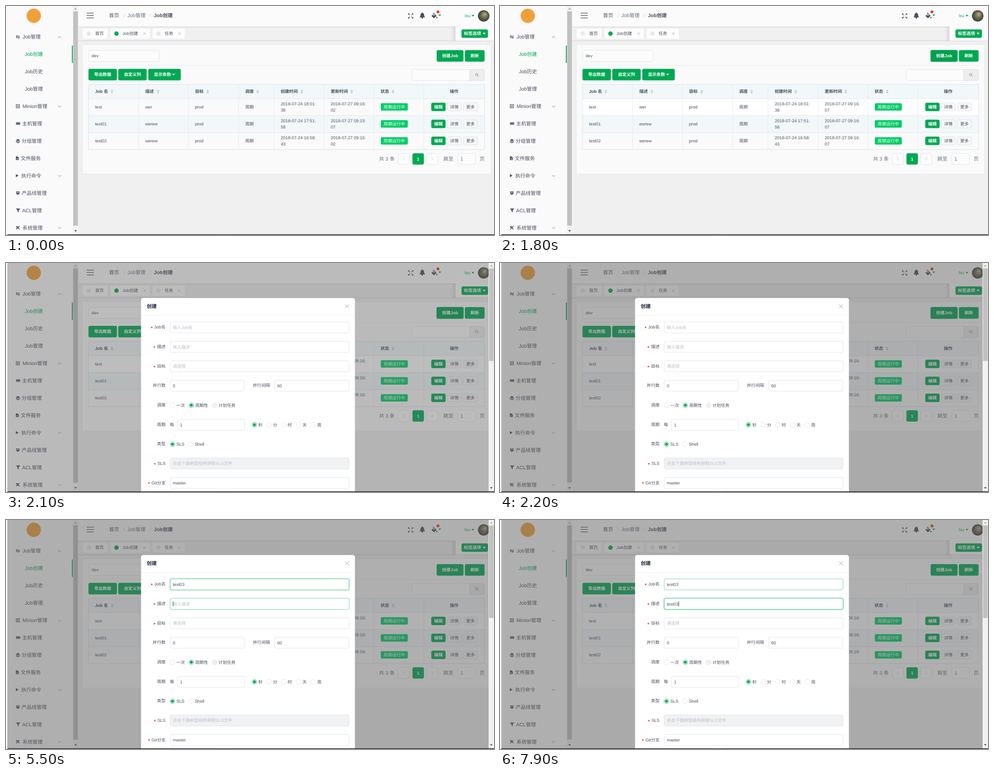
Write an HTML page with a canvas that moves like this. It is 1089 px wide and 514 px high and loops after 8 s.

```html
<!DOCTYPE html>
<html lang="zh-CN">
<head>
<meta charset="utf-8">
<title>Job创建</title>
<style>
html, body { margin: 0; width: 100%; height: 100%; overflow: hidden; background: #fff; }
canvas { display: block; width: 1089px; height: 514px; }
</style>
</head>
<body>
<canvas id="stage"></canvas>
<script>
const W = 1089, H = 514, LOOP = 8000, TICK = 100;
const S = 9.57, M = 11.16;
const FONT = '"Liberation Sans", "Noto Sans CJK SC", "Noto Sans CJK", sans-serif';
const GREEN = '#00a854', INK = '#495060', SOFT = '#657180', HINT = '#bbbec4', LINE = '#d7dde4';
const dpr = window.devicePixelRatio || 1;

function prepare(canvas) {
  canvas.width = W * dpr;
  canvas.height = H * dpr;
  return canvas.getContext('2d');
}
const stage = prepare(document.getElementById('stage'));
const layerCanvas = document.createElement('canvas');
const layer = prepare(layerCanvas);
let g = stage;

// ---------- drawing helpers ----------
function text(s, x, y, { size = S, color = INK, bold = false, align = 'left' } = {}) {
  g.font = `${bold ? 'bold ' : ''}${size}px ${FONT}`;
  g.textRendering = 'geometricPrecision';
  g.textAlign = align;
  g.fillStyle = color;
  g.fillText(s, x, y + size * 0.36);
}
function rect(x1, y1, x2, y2, fill) {
  g.fillStyle = fill;
  g.fillRect(x1, y1, x2 - x1, y2 - y1);
}
function box(x1, y1, x2, y2, fill, stroke, r = 3.2) {
  g.beginPath();
  g.roundRect(x1 + 0.4, y1 + 0.4, x2 - x1 - 0.8, y2 - y1 - 0.8, r);
  if (fill) { g.fillStyle = fill; g.fill(); }
  if (stroke) { g.strokeStyle = stroke; g.lineWidth = 0.8; g.stroke(); }
}
function path(points, { fill, stroke, width = 1, close = !!fill } = {}) {
  g.beginPath();
  points.forEach(([x, y], i) => i ? g.lineTo(x, y) : g.moveTo(x, y));
  if (close) g.closePath();
  if (fill) { g.fillStyle = fill; g.fill(); }
  if (stroke) { g.strokeStyle = stroke; g.lineWidth = width; g.stroke(); }
}
function dot(x, y, r, fill, stroke) {
  g.beginPath();
  g.arc(x, y, r, 0, Math.PI * 2);
  if (fill) { g.fillStyle = fill; g.fill(); }
  if (stroke) { g.strokeStyle = stroke; g.lineWidth = 0.8; g.stroke(); }
}
function tri(x, y, w, h, fill) {
  path([[x - w / 2, y - h / 2], [x + w / 2, y - h / 2], [x, y + h / 2]], { fill });
}
function cross(x, y, r, stroke, width) {
  path([[x - r, y - r], [x + r, y + r]], { stroke, width });
  path([[x - r, y + r], [x + r, y - r]], { stroke, width });
}
function fade(x1, y1, x2, y2, horizontal, from, to) {
  const grad = horizontal ? g.createLinearGradient(x1, 0, x2, 0) : g.createLinearGradient(0, y1, 0, y2);
  grad.addColorStop(0, from);
  grad.addColorStop(1, to);
  rect(x1, y1, x2, y2, grad);
}
function button(label, x1, y1, x2, y2, fill = GREEN, dx = 0) {
  box(x1, y1, x2, y2, fill, fill, 2.8);
  text(label, (x1 + x2) / 2 + dx, (y1 + y2) / 2, { color: '#fff', bold: true, align: 'center' });
}
function plainButton(label, x1, y1, x2, y2) {
  box(x1, y1, x2, y2, '#f7f7f7', LINE, 2.6);
  text(label, (x1 + x2) / 2, (y1 + y2) / 2, { align: 'center' });
}
const clamp = v => Math.max(0, Math.min(1, v));
const ramp = (t, start, length) => clamp((t - start) / length);
function mix(a, b, k) {
  return `rgb(${a.map((v, i) => Math.round(v + (b[i] - v) * k)).join()})`;
}

// ---------- sidebar ----------
const icons = {
  swap(x, y, c) {
    rect(x + 1.5, y - 2.3, x + 9, y - 1, c);
    rect(x, y + 1, x + 7.5, y + 2.3, c);
    path([[x, y - 1.6], [x + 3, y - 4], [x + 3, y + 0.6]], { fill: c });
    path([[x + 9, y + 1.6], [x + 6, y - 0.6], [x + 6, y + 4]], { fill: c });
  },
  grid(x, y, c) {
    for (let i = 0; i < 9; i++) {
      const gx = x + (i % 3) * 3.3, gy = y - 4.4 + Math.floor(i / 3) * 3.3;
      rect(gx, gy, gx + 2.2, gy + 2.2, c);
    }
  },
  keys(x, y, c) {
    box(x, y - 3, x + 10, y + 3, c, null, 0.8);
    for (let i = 0; i < 4; i++) rect(x + 1.3 + i * 2, y - 1.5, x + 2.2 + i * 2, y - 0.5, '#ccc');
    rect(x + 2.5, y + 0.8, x + 7.5, y + 1.5, '#ccc');
  },
  layers(x, y, c) {
    path([[x, y - 2], [x + 4.6, y - 4.3], [x + 9.2, y - 2], [x + 4.6, y + 0.3]], { fill: c });
    for (const d of [0.5, 2.7]) {
      path([[x + 0.2, y - 0.3 + d], [x + 4.6, y + 1.7 + d], [x + 9, y - 0.3 + d]], { stroke: c, width: 1.2 });
    }
  },
  doc(x, y, c) {
    path([[x, y - 4], [x + 4, y - 4], [x + 6.5, y - 1.5], [x + 6.5, y + 4], [x, y + 4]], { fill: c });
    rect(x + 1.3, y, x + 5, y + 0.7, '#eee');
    rect(x + 1.3, y + 1.8, x + 5, y + 2.5, '#eee');
  },
  play(x, y, c) { path([[x, y - 3.6], [x + 6, y], [x, y + 3.6]], { fill: c }); },
  crate(x, y, c) {
    path([[x, y - 2.5], [x + 2.3, y - 4], [x + 4.5, y - 2.4], [x + 6.7, y - 4], [x + 9, y - 2.5],
      [x + 7, y - 0.6], [x + 9, y + 1], [x + 4.5, y + 4.3], [x, y + 1], [x + 2, y - 0.6]], { fill: c });
    path([[x + 2.6, y - 0.7], [x + 4.5, y - 1.9], [x + 6.4, y - 0.7], [x + 4.5, y + 0.6]], { fill: '#f2f2f2' });
  },
  funnel(x, y, c) {
    path([[x, y - 4], [x + 10, y - 4], [x + 6.3, y], [x + 6.3, y + 4.5], [x + 3.7, y + 3], [x + 3.7, y]], { fill: c });
  },
  tools(x, y, c) {
    path([[x + 1, y + 3.6], [x + 8, y - 3.4]], { stroke: c, width: 1.7 });
    path([[x + 2.4, y - 2], [x + 8.2, y + 3.6]], { stroke: c, width: 1.7 });
    path([[x, y - 2], [x + 3.6, y - 4.2], [x + 4, y - 1.4], [x + 1.4, y]], { fill: c });
  }
};
const menu = [
  ['Job管理', 37, 'swap', 'up'], ['Job创建', 42], ['Job历史', 42], ['Job管理', 42],
  ['Minion管理', 37, 'grid', 'down'], ['主机管理', 36, 'keys'], ['分组管理', 35, 'layers'],
  ['文件服务', 33, 'doc'], ['执行命令', 34, 'play', 'down'], ['产品线管理', 35, 'crate'],
  ['ACL管理', 36, 'funnel'], ['系统管理', 37, 'tools', 'down']
];
function sidebar() {
  rect(0, 0, 149, H, '#fafafa');
  dot(62, 22, 16, '#f0a03a');
  menu.forEach(([label, x, icon, arrow], i) => {
    const y = 69.3 + i * 38.93, active = i === 1;
    if (icon) icons[icon](22, y, INK);
    text(label, x, y, { size: M, color: active ? GREEN : INK });
    if (active) rect(147, y - 19.5, 149, y + 19.5, GREEN);
    if (arrow) {
      const d = arrow === 'up' ? -1.8 : 1.8;
      path([[116, y + 0.5 - d], [119.7, y + 0.5 + d], [123.4, y + 0.5 - d]], { stroke: SOFT, width: 0.9 });
    }
  });
  rect(149, 0, 161.5, H, '#f1f1f1');
  rect(150, 12, 160.5, 493, '#c1c1c1');
  tri(155.3, 6, 6, -3.5, '#a3a3a3');
  tri(155.3, 505, 6, 3.5, '#505050');
}

// ---------- header and tabs ----------
function header() {
  rect(161.5, 46, W, H, '#f0f0f0');
  rect(161.5, 0, W, 46, '#fbfbfb');
  fade(161.5, 46, W, 49, false, 'rgba(0,0,0,.09)', 'rgba(0,0,0,0)');
  for (let i = 0; i < 3; i++) rect(180, 15.3 + i * 5.4, 196, 16.6 + i * 5.4, INK);
  text('首页', 230, 21, { size: M });
  text('/', 262.5, 21, { size: M, color: '#c9ced6' });
  text('Job管理', 271, 21, { size: M, color: SOFT });
  text('/', 320.5, 21, { size: M, color: '#c9ced6' });
  text('Job创建', 330, 21, { size: M, bold: true });

  for (const sx of [-1, 1]) for (const sy of [-1, 1]) {
    const p = (a, b) => [903 + sx * a, 22.2 + sy * b];
    path([p(5.8, 5.8), p(2.4, 5.8), p(5.8, 2.4)], { fill: INK });
    path([p(1.6, 1.6), p(5, 5)], { stroke: INK, width: 1.3 });
  }
  g.beginPath();
  g.moveTo(922.7, 25.5);
  g.quadraticCurveTo(925, 23, 925, 20);
  g.bezierCurveTo(925, 14, 933, 14, 933, 20);
  g.quadraticCurveTo(933, 23, 935.3, 25.5);
  g.closePath();
  g.fillStyle = INK;
  g.fill();
  dot(929, 26.6, 1.8, INK);
  rect(928.2, 14.6, 929.8, 17, INK);
  dot(964, 13.3, 3.2, '#ed3f14');
  path([[949.5, 22.5], [955, 16.5], [961, 22], [955, 27.5]], { fill: INK });
  path([[952, 21], [955.2, 18], [958, 21]], { fill: '#eee' });
  path([[953, 15], [957, 19]], { stroke: INK, width: 1.1 });
  dot(961.5, 26, 1.6, INK);
  tri(968, 21, 6, 4, GREEN);
  text('lxu', 1023.8, 22, { color: GREEN });
  tri(1042, 22, 6, 4, GREEN);

  const hue = g.createRadialGradient(1069, 18, 1, 1066, 22, 13);
  hue.addColorStop(0, '#b3a78a');
  hue.addColorStop(0.5, '#6d6a50');
  hue.addColorStop(1, '#3b4236');
  dot(1066, 22.3, 12.8, hue);
}
function tabs() {
  fade(161.5, 77, W, 80, false, 'rgba(0,0,0,.1)', 'rgba(0,0,0,0)');
  const tags = [
    [170, 228, 185, '首页', 199], [232, 322, 246.5, 'Job创建', 260, 309], [326, 400, 340, '任务', 354, 387]
  ];
  tags.forEach(([x1, x2, dx, label, tx, cx], i) => {
    box(x1, 49.5, x2, 74.5, '#fcfcfc', '#e9eaec', 2.4);
    dot(dx, 62, 4.9, i === 1 ? GREEN : '#e4eaee');
    text(label, tx, 62);
    if (cx) cross(cx, 62, 2.7, '#a0a4aa', 0.8);
  });
  fade(993, 46, 1003, 78, true, 'rgba(0,0,0,0)', 'rgba(0,0,0,.1)');
  rect(1003, 46, W, 77.5, '#fdfdfd');
  button('标签选项', 1016.5, 52.5, 1075.5, 71.5, GREEN, -5);
  tri(1067, 62, 6.5, 4, '#fff');
}

// ---------- job table ----------
const cols = [184, 296, 407, 519, 598, 710, 821, 932.5, 1068];
const heads = [['Job 名', 236.5], ['描述', 339], ['目标', 450], ['调度', 561.5],
  ['创建时间', 660], ['更新时间', 771.5], ['状态', 864]];
const jobs = [
  ['test', 'wer', '18:01:', '38', '16', '02'],
  ['test01', 'ewrew', '17:51:', '58', '15', '07'],
  ['test02', 'werew', '16:58:', '43', '16', '02']
];
function table(t) {
  const tx = i => cols[i] + 14.7;
  const blue = '#f2f7fa', edge = '#d3e2ec';
  rect(184, 176, 1068, 208, blue);
  heads.forEach(([label, sx], i) => {
    text(label, tx(i), 192, { bold: true });
    tri(sx, 189.6, 6, -3.4, HINT);
    tri(sx, 194.6, 6, 3.4, HINT);
  });
  text('操作', 1000, 192, { bold: true, align: 'center' });

  jobs.forEach(([name, note, clock, sec, min, upd], i) => {
    const top = 208 + i * 38.1, y = top + 18.4;
    rect(184, top, 1068, top + 38.1, i === 1 ? blue : i === 0 && t >= 1000 ? '#fff' : '#fafafa');
    const fresh = t >= 1700;
    text(name, tx(0), y);
    text(note, tx(1), y);
    text('prod', tx(2), y);
    text('周期', tx(3), y);
    text('2018-07-24 ' + clock, tx(4) + 0.5, y - 7.2);
    text(sec, tx(4) + 0.5, y + 7.2);
    text(`2018-07-27 09:${fresh ? '16' : min}:`, tx(5), y - 7.2);
    text(fresh ? '07' : upd, tx(5), y + 7.2);
    box(836, y - 8.6, 897, y + 8.8, '#00cc66', null, 2.4);
    text('周期运行中', 866.5, y, { color: '#fff', align: 'center' });
    button('编辑', 949, y - 9.4, 981, y + 9.6);
    plainButton('详情', 984.5, y - 9.4, 1016.5, y + 9.6);
    plainButton('更多', 1020.5, y - 9.4, 1052.5, y + 9.6);
    rect(184, top - 0.4, 1068, top + 0.4, edge);
  });
  cols.slice(1, -1).forEach(x => rect(x - 0.4, 176, x + 0.4, 322, '#dfe8ee'));
  box(183.6, 175.6, 1068.4, 322.6, null, '#cddce6', 0);
}
function pager() {
  const big = { size: M, color: SOFT };
  text('共 3 条', 832.6, 343, big);
  box(875, 330.5, 900.5, 356, '#fcfcfc', LINE);
  path([[889.3, 340], [886.3, 343.2], [889.3, 346.4]], { stroke: HINT, width: 0.9 });
  button('1', 907, 330.5, 932.5, 356);
  box(938.5, 330.5, 964, 356, '#fcfcfc', LINE);
  path([[949.8, 340], [952.8, 343.2], [949.8, 346.4]], { stroke: HINT, width: 0.9 });
  text('跳至', 976, 343, big);
  box(1008, 330.5, 1048, 356, '#fcfcfc', LINE);
  text('1', 1014, 343, big);
  text('页', 1057, 343, big);
}
function createButton(t) {
  const ring = Math.min(ramp(t, 1600, 200), 1 - ramp(t, 3000, 300));
  if (ring > 0) box(959.6, 97.6, 1022.4, 126.4, `rgba(0,150,90,${0.3 * ring})`, null, 4);
  const fill = t < 1400 ? GREEN : t < 1600 ? '#33b976' : t < 3100 ? '#00a050' : GREEN;
  button('创建Job', 961, 99, 1021, 125, fill);
}
function page(t) {
  rect(0, 0, W, H, '#fff');
  header();
  tabs();
  box(170, 86, 1082, 377.5, '#fafafa', '#e2e6ea', 3);
  box(184, 99, 342.5, 125, '#fcfcfc', LINE);
  text('dev', 191, 112);
  createButton(t);
  button('刷新', 1024, 99, 1068, 125);
  rect(184, 132.8, 1068, 133.6, '#e6e8eb');
  button('导出数据', 184, 141, 247.5, 167);
  button('自定义列', 250.5, 141, 314, 167);
  button('显示条数', 317.5, 141, 390, 167, GREEN, -4.5);
  tri(374, 154, 6.5, 4, '#fff');
  box(906, 142, 1068, 167.5, '#fcfcfc', LINE);
  box(1034, 142, 1068, 167.5, '#eeeeee', LINE, [0, 3.2, 3.2, 0]);
  dot(1050.3, 154, 2.6, null, SOFT);
  path([[1052.2, 156], [1054.4, 158.2]], { stroke: SOFT, width: 1 });
  table(t);
  pager();
  sidebar();
}
function bottomEdge() {
  rect(3, 512.6, W, H, '#15161a');
  rect(473, 512.6, 502, H, '#44464c');
}

// ---------- dialog ----------
const word = 'test03';
const keys1 = [3900, 4100, 4300, 4500, 4700, 5100];
const keys2 = [6000, 6100, 6300, 6400, 6700, 6900];
const typed = (keys, t) => word.slice(0, keys.filter(k => t >= k).length);
const between = (t, a, b) => t >= a && t < b;

function label(s, right, y, required) {
  text(s, right, y, { align: 'right' });
  if (required) text('*', right - g.measureText(s).width - 8, y + 2.4, { size: 11, color: '#ed3f14', bold: true });
}
function field(x1, x2, y, { value = '', hint = '', hover = 0, focus = 0, caret = false, off = false } = {}) {
  const top = y - 12.8, bottom = y + 12.8;
  if (focus > 0) box(x1 - 1.6, top - 1.6, x2 + 1.6, bottom + 1.6, `rgba(0,168,84,${0.24 * focus})`, null, 4.4);
  const tone = Math.max(focus, hover * 0.65);
  box(x1, top, x2, bottom, off ? '#f1f2f3' : '#fff', mix([215, 221, 228], [30, 178, 104], tone));
  const tx = x1 + 6.2;
  if (value) text(value, tx, y);
  else if (hint) text(hint, tx, y, { color: HINT });
  if (caret) {
    g.font = `${S}px ${FONT}`;
    const cx = tx + g.measureText(value).width + 0.2;
    rect(cx, y - 5.5, cx + 0.9, y + 5.5, '#222');
  }
}
function radio(s, x, y, state) {
  dot(x, y, 5.3, state === 'off' ? '#f0f1f2' : '#fff', state === 'on' ? GREEN : LINE);
  if (state === 'on') dot(x, y, 3.3, GREEN);
  text(s, x + 8.6, y);
}
function dialog(t) {
  box(301, 78, 779, 1194, '#fff', null, 4.8);
  text('创建', 314, 97.3, { size: M, bold: true, color: '#1c2438' });
  cross(761, 97.3, 4.4, '#999', 0.9);
  rect(301, 117.6, 779, 118.4, '#e9eaec');

  const row = i => 144.5 + i * 43.65;
  const names = ['Job名', '描述', '目标', '并行数', '调度', '周期', '类型', 'SLS', 'Git分支'];
  names.forEach((s, i) => label(s, 356, row(i) - 0.6, i < 3 || i > 6));

  const touch = Math.min(ramp(t, 2400, 200), 1 - ramp(t, 2700, 200));
  field(366, 766, row(0), {
    value: typed(keys1, t), hint: '输入Job名',
    hover: t >= 7900 ? 1 : Math.max(touch, 0),
    focus: t < 5500 ? ramp(t, 3000, 300) : t < 5600 ? 0.85 : 0,
    caret: between(t, 3100, 3600) || between(t, 3900, 5500)
  });
  field(366, 766, row(1), {
    value: typed(keys2, t), hint: '输入描述',
    focus: ramp(t, 5400, 200),
    caret: between(t, 5500, 7400) || t >= 7900
  });
  field(366, 766, row(2), { hint: '请选择' });
  field(366, 532, row(3), { value: '0' });
  label('并行间隔', 589, row(3) - 0.6);
  field(599, 765.5, row(3), { value: '60' });

  const y4 = row(4) + 0.2, y5 = row(5) + 0.4, y6 = row(6) + 0.4;
  radio('一次', 371.5, y4);
  radio('周期性', 413.6, y4, 'on');
  radio('计划任务', 465.3, y4, 'off');
  text('每', 365.5, y5 - 0.4);
  field(382, 533, row(5) + 0.6, { value: '1' });
  [...'秒分时天周'].forEach((s, i) => radio(s, 554.4 + i * 32.8, y5, i ? '' : 'on'));
  radio('SLS', 371.5, y6, 'on');
  radio('Shell', 412.6, y6);
  field(366, 766, row(7), { hint: '点击下面树型结构获取SLS文件', off: true });
  field(366, 766, row(8), { value: 'master' });
}
function overlay(t) {
  const open = ramp(t, 1900, 200);
  const shade = t < 2100 ? 0.22 : t < 2200 ? 0.4 : 0.47;
  rect(3, 0, 1077, 512.6, `rgba(90,90,90,${shade})`);

  // The dialog fades as one group while it grows about its centre.
  g = layer;
  g.setTransform(1, 0, 0, 1, 0, 0);
  g.clearRect(0, 0, W * dpr, H * dpr);
  const k = 0.9 + 0.1 * open;
  g.setTransform(dpr * k, 0, 0, dpr * k, dpr * 540 * (1 - k), dpr * 636 * (1 - k));
  dialog(t);
  g = stage;
  g.globalAlpha = open;
  g.drawImage(layerCanvas, 0, 0, W, H);
  g.globalAlpha = 1;

  rect(1077, 0, W, 512.6, '#f1f1f1');
  rect(1078, 12, 1088.2, 220, '#c1c1c1');
  tri(1083, 6, 6, -3.5, '#a3a3a3');
  tri(1083, 505, 6, 3.5, '#505050');
}

function render(t) {
  g = stage;
  g.setTransform(dpr, 0, 0, dpr, 0, 0);
  page(t);
  if (t >= 2000) overlay(t);
  bottomEdge();
}

const start = performance.now();
function loop() {
  const t = (performance.now() - start) % LOOP;
  render(Math.floor(t / TICK) * TICK);
  requestAnimationFrame(loop);
}
render(0);
requestAnimationFrame(loop);
</script>
</body>
</html>
```
